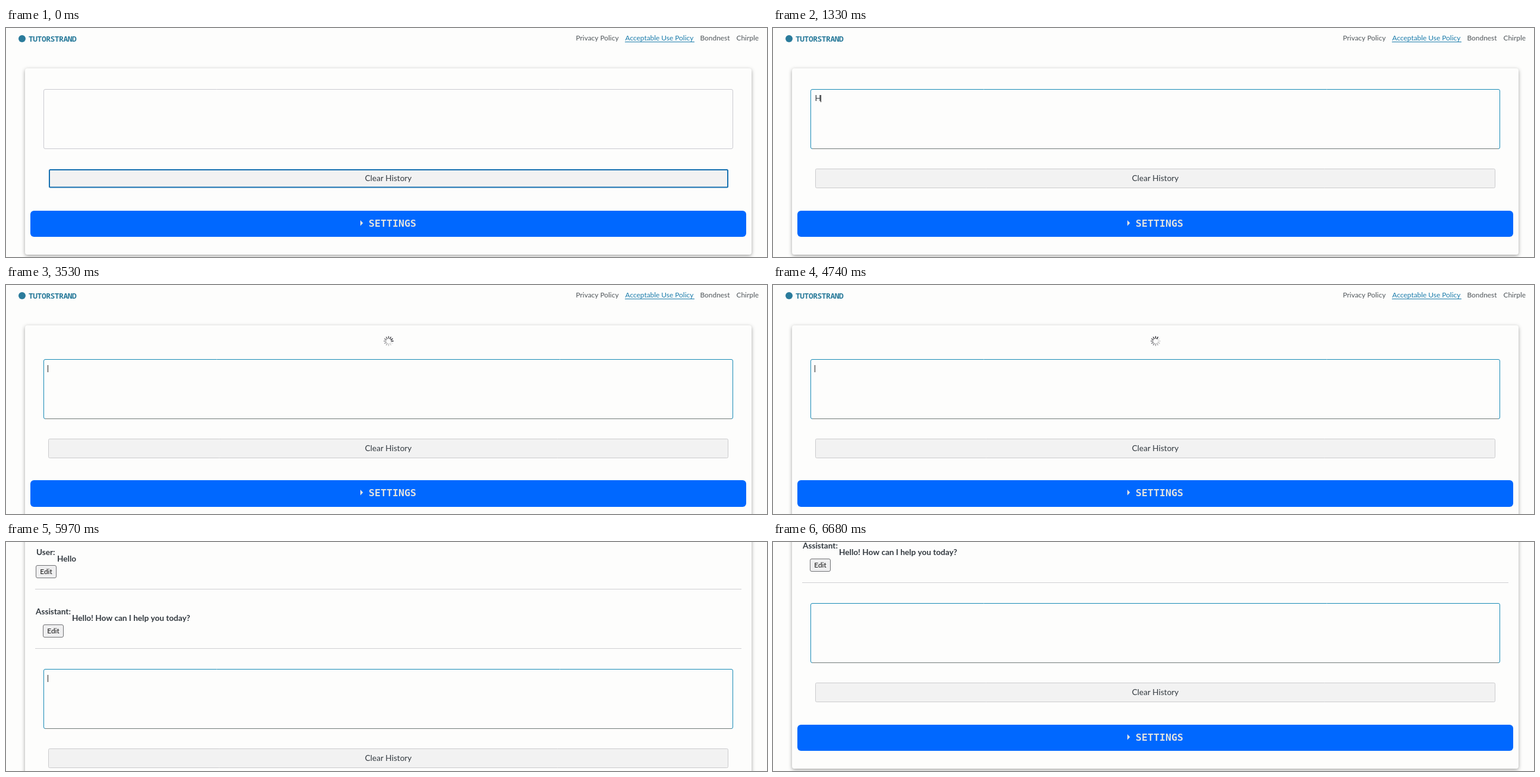
Animation, 1280 px wide and 386 px high, one loop 6.92 s. Source, as an HTML page with a canvas:

```html
<!DOCTYPE html>
<html lang="en">
<head>
<meta charset="utf-8">
<title>Chat page</title>
<style>
  html, body { margin: 0; width: 100%; height: 100%; overflow: hidden; background: #fdfdfc; }
  canvas { display: block; width: 1280px; height: 386px; }
</style>
</head>
<body>
<canvas id="stage" width="1280" height="386"></canvas>
<script>
const ctx = document.getElementById('stage').getContext('2d');
const LOOP = 6920;
const FOCUS = 340, SEND = 2330, REPLY = 5840;
const KEY_TIMES = [1330, 1640, 1780, 1920, 2080];
const PAPER = '#fdfdfc', INK = '#333a40', TEAL = [22, 138, 182], GREY = [202, 202, 208];
const REPLY_HEIGHT = 201, SPINNER_HEIGHT = 21.6;
// The page is shown at 85% zoom.
const BODY = 13.6, SMALL = 11.9;

const clamp = v => Math.max(0, Math.min(1, v));
const smooth = v => v * v * (3 - 2 * v);
const mix = (a, b, p) => `rgb(${a.map((v, i) => Math.round(v + (b[i] - v) * p)).join()})`;
const lato = (size, weight = 400) => `${weight} ${size}px Lato, sans-serif`;

function text(str, x, y, font, color = INK, align = 'left') {
  ctx.font = font;
  ctx.fillStyle = color;
  ctx.textAlign = align;
  ctx.fillText(str, x, y);
}

function box(x, y, w, h, r, fill, stroke, line = 1) {
  ctx.beginPath();
  ctx.roundRect(x, y, w, h, r);
  if (fill) { ctx.fillStyle = fill; ctx.fill(); }
  if (stroke) { ctx.strokeStyle = stroke; ctx.lineWidth = line; ctx.stroke(); }
}

function rect(x, y, w, h, color) {
  ctx.fillStyle = color;
  ctx.fillRect(x, y, w, h);
}

function drawHeader() {
  ctx.fillStyle = '#2a7b9b';
  ctx.beginPath();
  ctx.arc(27, 18, 6, 0, 2 * Math.PI);
  ctx.fill();
  ctx.letterSpacing = '-0.5px';
  text('TUTORSTRAND', 38, 23, '700 13px "Noto Sans Mono", monospace', '#2a7b9b');
  ctx.letterSpacing = '0px';

  const link = lato(SMALL);
  text('Privacy Policy', 958.5, 21, link, '#50565a');
  text('Acceptable Use Policy', 1041.5, 21, link, '#1a7cab');
  rect(1041, 23, 117, 1, '#1a7cab');
  text('Bondnest', 1167.5, 21, link, '#50565a');
  text('Chirple', 1228.5, 21, link, '#50565a');
}

function drawCard(height) {
  ctx.save();
  ctx.shadowColor = 'rgba(0,0,0,.36)';
  ctx.shadowBlur = 6;
  ctx.shadowOffsetY = 2;
  box(32, 68, 1222, height, 4, PAPER);
  ctx.restore();
}

function drawMessage(y, role, roleX, str, strX, editX) {
  text(role, roleX, y + 22, lato(BODY, 700));
  text(str, strX, y + 33, lato(BODY, 700));
  box(editX + .5, y + 39.5, 34, 21, 2.5, '#efeff0', '#707174');
  text('Edit', editX + 17.5, y + 53.5, lato(SMALL), '#111', 'center');
  rect(49, y + 79, 1188, 1, '#cfcfd2');
}

function drawSpinner(t) {
  const head = 5 + Math.floor((t - SEND) / 120);
  ctx.save();
  ctx.translate(643.5, 94.5);
  ctx.lineWidth = 1.5;
  for (let i = 0; i < 12; i++) {
    const age = (((head - i) % 12) + 12) % 12;
    const a = i * Math.PI / 6;
    ctx.strokeStyle = `rgba(35,35,42,${1 - age * .08})`;
    ctx.beginPath();
    ctx.moveTo(4 * Math.sin(a), -4 * Math.cos(a));
    ctx.lineTo(8.3 * Math.sin(a), -8.3 * Math.cos(a));
    ctx.stroke();
  }
  ctx.restore();
}

function caretVisible(t) {
  if (t < FOCUS) return false;
  if (t < KEY_TIMES[0]) return t < 840;
  if (t < SEND) return true;
  if (t < REPLY) return Math.floor((t - SEND) / 500) % 2 === 0;
  return t < 6290;
}

function drawForm(t) {
  const focus = clamp((t - FOCUS) / 210);
  const typed = t < SEND ? 'Hello'.slice(0, KEY_TIMES.filter(k => t >= k).length) : '';

  box(63.5, 103.5, 1159, 100, 2.5, null, mix(GREY, TEAL, focus));
  rect(66, 203, 1154, 1, mix(GREY, [112, 122, 120], focus));
  text(typed, 70.5, 123, lato(BODY));
  if (caretVisible(t)) {
    rect(Math.floor(70.5 + ctx.measureText(typed).width), 113, 1, 12, '#222');
  }

  box(71.5, 237.5, 1143, 32, 2, '#f2f2f2', '#cbcbcd');
  if (focus < 1) {
    ctx.globalAlpha = 1 - focus;
    box(71, 237, 1144, 33, 2, PAPER);
    box(73, 239, 1141, 29.5, 1.5, '#f2f2f2', '#1670b0', 2);
    ctx.globalAlpha = 1;
  }
  text('Clear History', 643, 258, lato(BODY), INK, 'center');
}

// Edges snap to whole pixels after layout.
function drawSettings(offset) {
  const top = Math.round(307.8 + offset), bottom = Math.round(352.3 + offset);
  box(41, top, 1204, bottom - top, 6, '#0068ff');
  ctx.fillStyle = '#e2e4e2';
  ctx.beginPath();
  ctx.moveTo(596, top + 16);
  ctx.lineTo(600.5, top + 20.7);
  ctx.lineTo(596, top + 25.4);
  ctx.fill();
  text('SETTINGS', 610, top + 27, '700 16.6px "DejaVu Sans Mono", monospace', '#dfe2e0');
}

// The page scrolls to its end in nine held steps.
function scrollAt(t) {
  if (t < REPLY) return 0;
  const step = Math.floor((t - REPLY + 7) / 33.4);
  return Math.round(REPLY_HEIGHT * smooth(clamp((step + .2) / 9)));
}

function draw(t) {
  const waiting = t >= SEND && t < REPLY, replied = t >= REPLY;
  const extra = replied ? REPLY_HEIGHT : waiting ? SPINNER_HEIGHT : 0;

  rect(0, 0, 1280, 386, PAPER);
  ctx.save();
  ctx.translate(0, -scrollAt(t));
  drawHeader();
  drawCard(314 + Math.round(extra));
  if (waiting) drawSpinner(t);
  if (replied) {
    drawMessage(90, 'User:', 51, 'Hello', 86, 50);
    drawMessage(190, 'Assistant:', 50, 'Hello! How can I help you today?', 111, 62);
  }
  drawSettings(extra);
  ctx.translate(0, Math.round(extra));
  drawForm(t);
  ctx.restore();
}

const start = performance.now();
function tick() {
  draw((performance.now() - start) % LOOP);
  requestAnimationFrame(tick);
}
tick();
</script>
</body>
</html>
```
